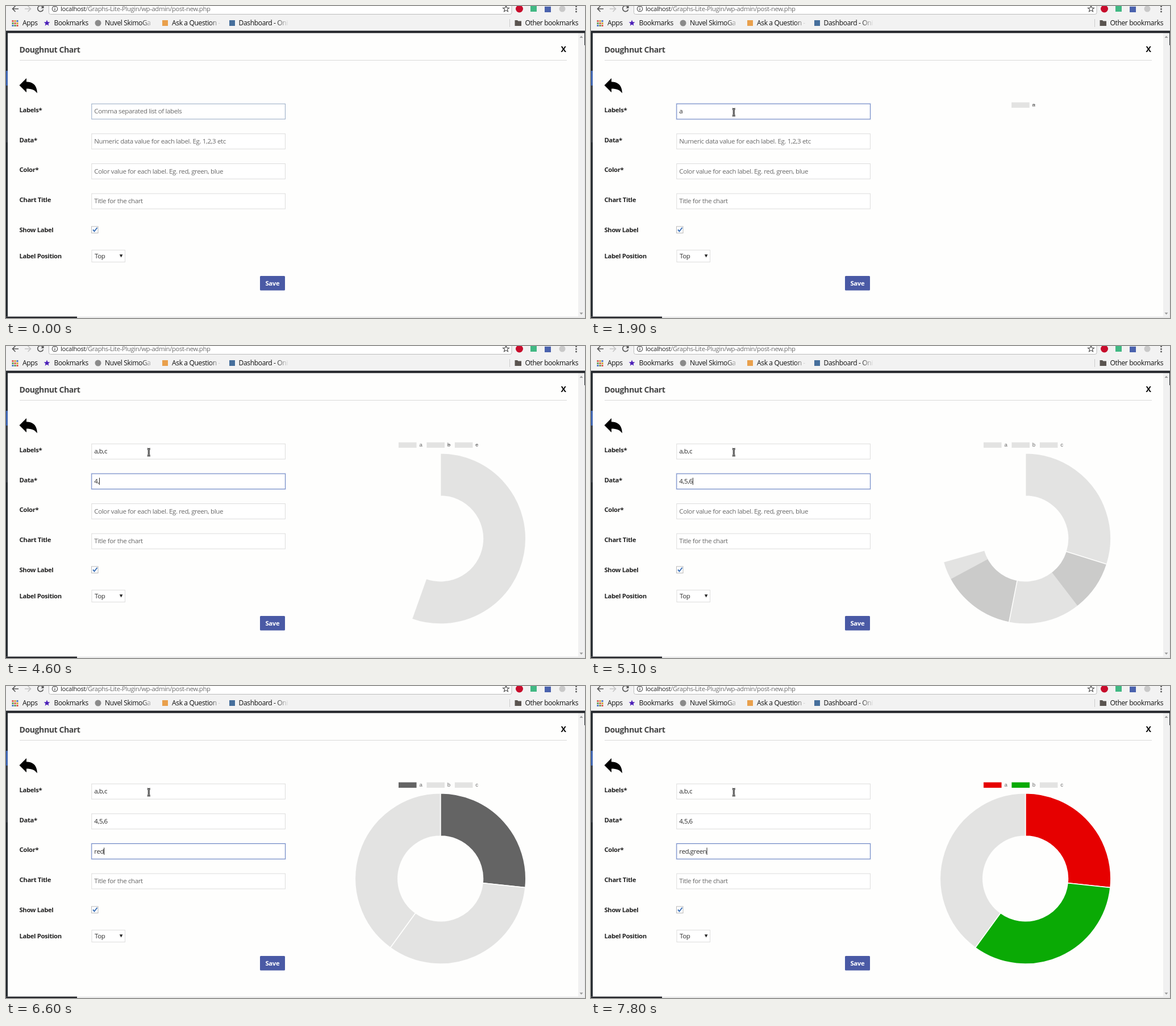
Write an HTML page that moves like this. It is 1019 px wide and 549 px high and loops after 8 s.

```html
<!DOCTYPE html>
<html lang="en">
<head>
<meta charset="utf-8">
<title>Doughnut Chart form</title>
<style>
html, body { margin: 0; width: 100%; height: 100%; overflow: hidden; background: #fefefd; }
svg { display: block; }
text { font-family: "Open Sans", "Noto Sans", sans-serif; font-size: 11.5px; letter-spacing: -.032em; white-space: pre; }
.bar { font-size: 12.1px; fill: #111; }
.url { font-size: 11.3px; fill: #6c6c6c; }
.label { font-size: 11.3px; font-weight: 700; fill: #222; }
.title { font-size: 14.1px; font-weight: 700; fill: #444; }
.save { font-size: 11.3px; font-weight: 700; fill: #fff; }
.key { font-family: "Liberation Sans", Arial, sans-serif; font-size: 9.6px; letter-spacing: 0; fill: #666; }
</style>
</head>
<body>
<svg id="stage" width="1019" height="549" viewBox="0 0 1019 549">
  <defs>
    <linearGradient id="fade">
      <stop offset="0" stop-color="#f2f2f2" stop-opacity="0"/>
      <stop offset=".6" stop-color="#f2f2f2"/>
    </linearGradient>
    <path id="star" d="M0 -5.500L1.500 -1.800L5.400 -1.600L2.400 .9L3.400 4.700L0 2.600L-3.400 4.700L-2.400 .9L-5.400 -1.600L-1.500 -1.800Z"/>
    <path id="beam" d="M-2.500 -6Q0 -6 0 -4.500Q0 -6 2.500 -6M0 -5V5M-2.500 6Q0 6 0 4.500Q0 6 2.500 6"/>
  </defs>

  <g id="browser">
    <rect width="1019" height="44" fill="#f2f2f2"/>
    <path d="M75.500 -2V11.500Q75.500 14.500 78.500 14.500H887Q890 14.500 890 11.500V-2" fill="#fff" stroke="#bbb"/>
    <g fill="none" stroke="#555" stroke-width="1.600">
      <path d="M22 5H12M16.500 0L11.500 5L16.500 10"/>
      <path d="M33 5H43M38.500 0L43.500 5L38.500 10" stroke="#c4c4c4"/>
      <path d="M65 2A5 5 0 1 0 65.500 6"/>
      <circle cx="86" cy="5" r="4.700" stroke-width="1.200"/>
      <path d="M86 4V8M86 1.800V3" stroke-width="1.300"/>
    </g>
    <path d="M66.500 -1V4H61.500Z" fill="#555"/>
    <text class="url" x="96" y="9"><tspan fill="#222">localhost</tspan>/Graphs-Lite-Plugin/wp-admin/post-new.php</text>
    <use href="#star" transform="translate(880 5)" fill="none" stroke="#555" stroke-width="1.200"/>
    <circle cx="903.500" cy="5" r="6.500" fill="#c70d2c"/>
    <rect x="923" y="0" width="11" height="10" fill="#41b883"/>
    <rect x="948" y="1" width="11" height="10" fill="#4a62ad"/>
    <circle cx="979" cy="5" r="5.500" fill="#c9c9c9"/>
    <g fill="#555"><circle cx="1003.500" cy="1" r="1.400"/><circle cx="1003.500" cy="5.500" r="1.400"/><circle cx="1003.500" cy="10" r="1.400"/></g>

    <g id="apps"></g>
    <use href="#star" transform="translate(72 30)" fill="#4b1fb8"/>
    <circle cx="162" cy="30" r="5.500" fill="#8b8b8b"/>
    <rect x="275" y="25" width="10" height="10" fill="#e9a04c"/>
    <rect x="393" y="25" width="10" height="10" fill="#466f9c"/>
    <text class="bar" x="29" y="34">Apps</text>
    <text class="bar" x="84.500" y="34">Bookmarks</text>
    <text class="bar" x="174" y="34">Nuvel SkimoGa</text>
    <text class="bar" x="292" y="34">Ask a Question -</text>
    <text class="bar" x="409.500" y="34">Dashboard - Oni</text>
    <rect x="238" y="20" width="36" height="20" fill="url(#fade)"/>
    <rect x="360" y="20" width="30" height="20" fill="url(#fade)"/>
    <rect x="474" y="20" width="40" height="20" fill="url(#fade)"/>
    <path d="M886.500 23V37" stroke="#ccc"/>
    <path d="M895.500 25H900L901.500 26.500H907V35H895.500Z" fill="#5a5450"/>
    <text class="bar" x="913.500" y="34">Other bookmarks</text>
  </g>

  <g id="frame">
    <rect y="43.500" width="1019" height="4.500" fill="#23252a"/>
    <rect y="44" width="3" height="505" fill="#23282d"/>
    <rect y="114" width="3" height="26" fill="#3c63b0"/>
    <rect y="140" width="3" height="100" fill="#363b41"/>
    <rect x="3" y="47.600" width="1004" height="499" fill="#fefefd"/>
    <rect x="1007" y="47.600" width="11" height="499" fill="#f1f1f1"/>
    <rect x="1018" y="48" width="1" height="501" fill="#e4e4e4"/>
    <rect x="1018" y="44" width="1" height="25" fill="#23282d"/>
    <path d="M1009.500 56L1012.500 52.500L1015.500 56ZM1009.500 539.500L1012.500 543L1015.500 539.500Z" fill="#999"/>
    <rect y="546.600" width="1019" height="2.400" fill="#e8e8e8"/>
    <rect y="546.600" width="125" height="2.400" fill="#23252a"/>
  </g>

  <g id="form">
    <text class="title" x="23.500" y="81.500">Doughnut Chart</text>
    <text class="title" x="976.500" y="81" style="fill:#000">X</text>
    <path d="M24 95.500H987" stroke="#d9d9d9"/>
    <path d="M23.500 139.500L36 127V133.500C47 133.500 54.500 139 55 153.500C50.500 147.500 45 145.500 36 145.500V152Z" fill="#000"/>
    <text class="label" x="23.500" y="397.500">Show Label</text>
    <rect x="150.500" y="388" width="11.500" height="11.500" fill="#fff" stroke="#b9b9b9"/>
    <path d="M153 393.500L155.500 396.500L160.500 390" fill="none" stroke="#3f73b8" stroke-width="2"/>
    <text class="label" x="23.500" y="443.500">Label Position</text>
    <rect x="151" y="429.500" width="58.500" height="21" fill="#fff" stroke="#ddd"/>
    <text x="156" y="444" fill="#333">Top</text>
    <path d="M199.800 437.200H205.400L202.600 442.600Z" fill="#222"/>
    <rect x="447" y="475" width="44" height="25.500" rx="1.500" fill="#4a5aa5"/>
    <text class="save" x="456.500" y="492">Save</text>
  </g>
  <g id="fields"></g>
  <path id="caret" stroke="#222" stroke-width="1"/>
  <g id="legend"></g>
  <g id="chart" stroke="#fefefd" stroke-width="1.600"></g>
  <g id="pointer" fill="none">
    <use href="#beam" stroke="#222" stroke-width="3"/>
    <use href="#beam" stroke="#ddd" stroke-width=".8"/>
  </g>
</svg>
<script>
const LOOP = 8000, STEP = 100;
const GREY = 'rgba(0,0,0,.105)', DARK = '#646464', RED = '#e60000', GREEN = '#0aaa05';
const $ = id => document.getElementById(id);

function add(parent, tag, attrs, content = '') {
  const el = document.createElementNS('http://www.w3.org/2000/svg', tag);
  for (const name in attrs) el.setAttribute(name, attrs[name]);
  el.textContent = content;
  parent.append(el);
  return el;
}

// Latest value in a list of [time, value] steps.
function at(steps, t) {
  let value = steps[0][1];
  for (const [time, next] of steps) if (t >= time) value = next;
  return value;
}

const typed = [
  [[0, ''], [1400, 'a'], [2100, 'a,'], [2300, 'a,b'], [2500, 'a,b,'], [2800, 'a,b,c']],
  [[0, ''], [4200, '4'], [4500, '4,'], [4700, '4,5'], [4800, '4,5,'], [5000, '4,5,6']],
  [[0, ''], [6100, 'r'], [6300, 're'], [6600, 'red'], [6800, 'red,'], [7000, 'red,g'],
   [7200, 'red,gr'], [7400, 'red,gre'], [7600, 'red,gree'], [7800, 'red,green']],
  [[0, '']]
];
const focus = [[0, 0], [3400, 1], [5300, 2]];
const caretOn = [[0, 0], [400, 1], [900, 0], [1400, 1], [1900, 0], [2100, 1], [3300, 0],
  [3400, 1], [3900, 0], [4200, 1], [5800, 0], [6100, 1]];
const keys = [[0, null], [1500, 'a'], [2300, 'a,'], [2400, 'a,b'], [2500, 'a,b,'], [3000, 'a,b,c']];
const shown = [[0, 0], [3500, 1], [4700, 2], [4900, 3]];
const fills = [
  [[0, GREY], [6600, DARK], [6700, RED]],
  [[0, GREY], [7100, RED], [7800, GREEN]],
  [[0, GREY]]
];
const keyFills = [fills[0], [[0, GREY], [7100, DARK], [7800, GREEN]], fills[2]];

// Each chart update eases every slice's [start, sweep] from wherever it was.
const updates = [
  { time: 4417, span: 1000, goal: [[0, 360], [0, 0], [0, 0]] },
  { time: 4640, span: 1174, goal: [[0, 160], [160, 200], [236, 0]] },
  { time: 4966, span: 1000, goal: [[0, 96], [96, 120], [216, 144]] }
];

function slicesAt(t) {
  let pose = [[0, 0], [0, 0], [0, 0]];
  updates.forEach(({ time, span, goal }, i) => {
    if (t < time) return;
    const end = i + 1 < updates.length ? Math.min(t, updates[i + 1].time) : t;
    const ease = 1 - (1 - Math.min(1, (end - time) / span)) ** 4;
    pose = pose.map((slice, k) => slice.map((v, j) => v + (goal[k][j] - v) * ease));
  });
  return pose;
}

function ring([start, sweep]) {
  if (sweep < .1) return '';
  const point = (r, deg) => {
    const a = deg * Math.PI / 180;
    return `${764.6 + r * Math.sin(a)} ${338.9 - r * Math.cos(a)}`;
  };
  const end = start + Math.min(sweep, 359.9), big = +(sweep > 180);
  return `M${point(150.2, start)}A150.2 150.2 0 ${big} 1 ${point(150.2, end)}` +
    `L${point(74.8, end)}A74.8 74.8 0 ${big} 0 ${point(74.8, start)}Z`;
}

const appColors = ['#d9534f', '#5a9a4a', '#4a72c4', '#d0a52c'];
for (let i = 0; i < 9; i++) {
  add($('apps'), 'rect', { x: 10.5 + i % 3 * 4, y: 25 + Math.floor(i / 3) * 4, width: 3, height: 3, fill: appColors[i * 3 % 4] });
}

const fields = [
  ['Labels*', 'Comma separated list of labels'],
  ['Data*', 'Numeric data value for each label. Eg. 1,2,3 etc'],
  ['Color*', 'Color value for each label. Eg. red, green, blue'],
  ['Chart Title', 'Title for the chart']
].map(([label, hint], i) => {
  const y = 172.2 + i * 52.65, box = { x: 150.8, width: 340.6, height: 26.8, y };
  add($('fields'), 'text', { class: 'label', x: 23.5, y: y + 14.8 }, label);
  const glow = add($('fields'), 'rect', { ...box, fill: 'none', stroke: '#7f9ad8', 'stroke-width': 3, 'stroke-opacity': .25 });
  const border = add($('fields'), 'rect', { ...box, fill: '#fff' });
  const text = add($('fields'), 'text', { x: 155.3, y: y + 17 });
  return { y, hint, glow, border, text };
});

const items = [0, 1, 2].map(() => ({
  box: add($('legend'), 'rect', { y: 169.5, width: 31.6, height: 9.6 }),
  text: add($('legend'), 'text', { class: 'key', y: 177.3 }),
  strike: add($('legend'), 'path', { stroke: '#666', 'stroke-width': 1 })
}));
const arcs = [0, 1, 2].map(() => add($('chart'), 'path', {}));

function drawFields(t) {
  const active = at(focus, t);
  fields.forEach((field, i) => {
    const value = at(typed[i], t), on = i === active;
    field.text.textContent = value || field.hint;
    field.text.setAttribute('fill', value ? '#2c2c2c' : '#6a6a6a');
    field.border.setAttribute('stroke', !on ? '#dcdcdc' : t < 100 ? '#94a8c4' : '#6c83c2');
    field.glow.style.display = on && t >= 100 ? '' : 'none';
  });
  const { text, y } = fields[active];
  const x = 155.5 + (at(typed[active], t) ? text.getComputedTextLength() + .3 : 0);
  $('caret').setAttribute('d', at(caretOn, t) ? `M${x} ${y + 7}V${y + 19.5}` : '');
}

function drawLegend(t) {
  const value = at(keys, t), names = value === null ? [] : value.split(',');
  items.forEach((item, i) => { item.text.textContent = names[i] || ''; });
  const widths = names.map((name, i) => name ? items[i].text.getComputedTextLength() : 0);
  let x = 761 - (widths.reduce((sum, w) => sum + 36.5 + w, 0) + 7.6 * (names.length - 1)) / 2;
  items.forEach(({ box, text, strike }, i) => {
    const live = i < names.length, w = widths[i];
    box.style.display = live ? '' : 'none';
    strike.setAttribute('d', live && w && i >= at(shown, t) ? `M${x + 36.5} 174H${x + 36.5 + w}` : '');
    if (!live) return;
    box.setAttribute('x', x);
    box.setAttribute('fill', at(keyFills[i], t));
    text.setAttribute('x', x + 36.5);
    x += 44.1 + w;
  });
}

function drawChart(t) {
  slicesAt(t).forEach((slice, i) => {
    arcs[i].setAttribute('d', ring(slice));
    arcs[i].setAttribute('fill', at(fills[i], t));
  });
}

function drawPointer(t) {
  const left = (1 - Math.min(1, Math.max(0, (t - 100) / 800))) ** 2;
  $('pointer').style.display = t < 100 ? 'none' : '';
  $('pointer').setAttribute('transform', `translate(${251.3 + 10 * left} ${187 + 30 * left})`);
}

const began = performance.now();
function draw() {
  const t = Math.floor((performance.now() - began) % LOOP / STEP) * STEP;
  drawFields(t);
  drawLegend(t);
  drawChart(t);
  drawPointer(t);
  requestAnimationFrame(draw);
}
draw();
</script>
</body>
</html>
```
